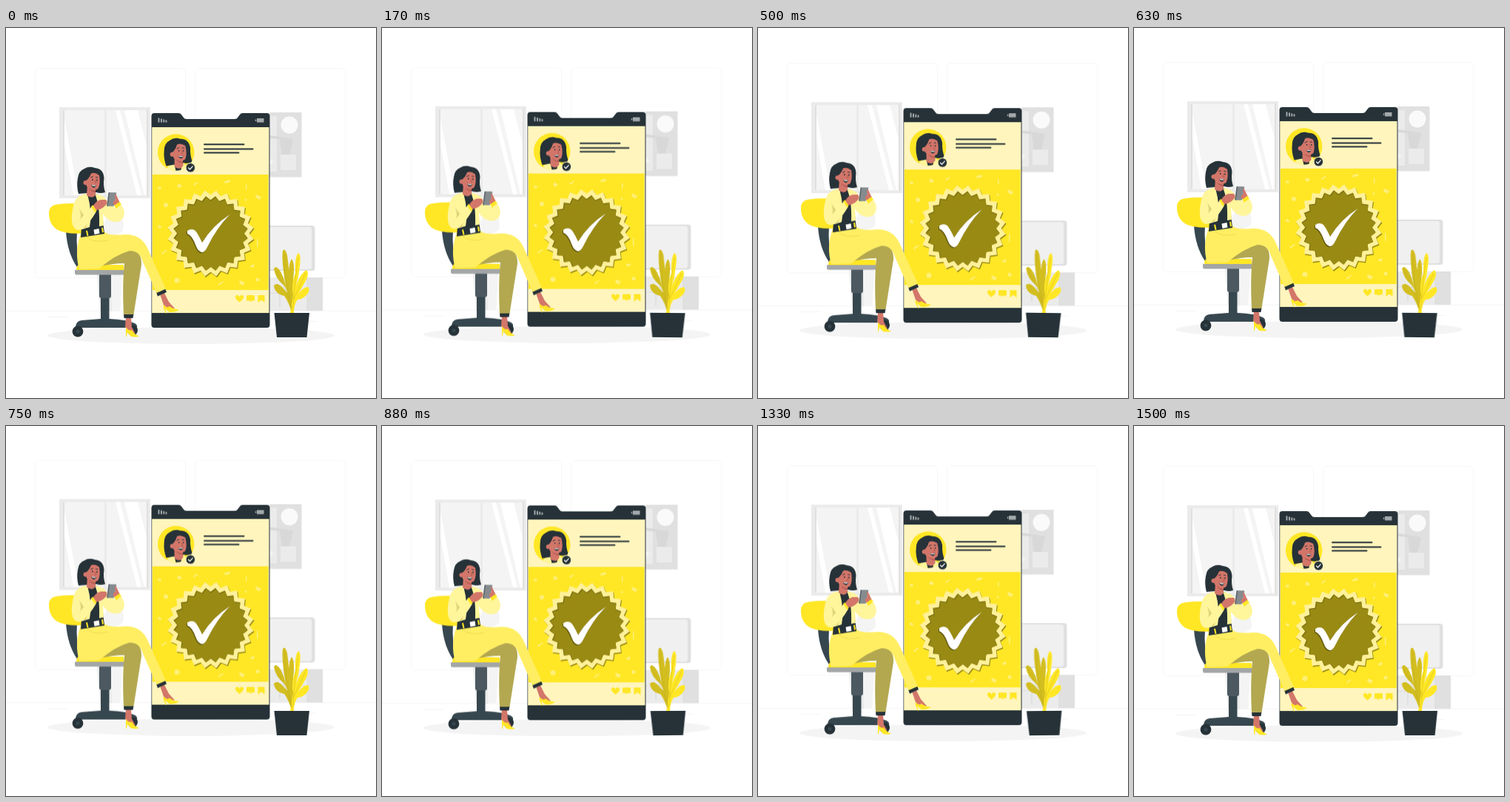
Write an HTML page without scripts that moves like this. It is 500 px wide and 500 px high and loops after 1540 ms.

```html
<!DOCTYPE html>
<html lang="en">
<head>
<meta charset="utf-8">
<title>Verified profile</title>
<style>
  html, body { margin: 0; width: 100%; height: 100%; overflow: hidden; background: #fff; }
  svg { display: block; width: 100%; height: 100%; }
  .float { animation: float 770ms cubic-bezier(.37, 0, .63, 1) -45ms infinite alternate; }
  .sway { transform-origin: 387px 345px; animation: sway 770ms cubic-bezier(.37, 0, .63, 1) -385ms infinite alternate; }
  @keyframes float { from { transform: translateY(.1px); } to { transform: translateY(-8.4px); } }
  @keyframes sway { from { transform: rotate(-.8deg); } to { transform: rotate(.8deg); } }
  .dark { fill: #263238; }
  .steel { fill: #37474f; }
  .sun { fill: #ffe725; }
  .cream { fill: #fff5bd; }
  .jacket { fill: #fff59b; }
  .trouser { fill: #ffee62; }
  .olive { fill: #998a14; }
  .shade { fill: #b3a850; }
  .mustard { fill: #d3be20; }
  .skin { fill: #d3766a; }
  .white { fill: #fff; }
  .g1 { fill: #f4f4f4; }
  .g2 { fill: #ebebeb; }
  .g3 { fill: #e0e0e0; }
  .line { fill: none; stroke-linecap: round; stroke-linejoin: round; }
</style>
</head>
<body>
<svg viewBox="0 0 500 500">
  <defs>
    <!-- six turned squares form a seal with 24 points -->
    <rect id="sq" x="-41.4" y="-41.4" width="82.8" height="82.8"/>
    <g id="seal" transform="rotate(7.5)">
      <use href="#sq"/>
      <use href="#sq" transform="rotate(15)"/>
      <use href="#sq" transform="rotate(30)"/>
      <use href="#sq" transform="rotate(45)"/>
      <use href="#sq" transform="rotate(60)"/>
      <use href="#sq" transform="rotate(75)"/>
    </g>
    <path id="tick" d="M245 274q6-4 11 0q4 5 9 16q14-23 37.500-38q-18 18-31 45q-3 6-7 6q-5-1-8-9q-5-14-11.500-16z"/>
    <clipPath id="portrait"><circle cx="229.700" cy="168" r="24.700"/></clipPath>

    <g id="head">
      <path class="dark" d="M97 203Q98 193 106 190Q112 186 120 189Q132 190 132.500 203Q131 213 134 222Q128 224 122 222L98 224Q95 213 97 203Z"/>
      <path class="skin" d="M110 212L121 217V225Q117 232 109 226Z"/>
      <path d="M111 215Q115 220 121 220V222Q114 221 111 215Z" fill="#b0584f"/>
      <path class="skin" d="M107 207Q112 204 115 196.500Q120 194 126 199Q128 210 124.500 217Q117 222 109 214Z"/>
      <circle class="skin" cx="107.500" cy="209" r="3"/>
      <path class="line" d="M114.500 202l3-1.300M121.500 201.500l2.500.5" stroke="#263238" stroke-width=".9"/>
      <circle class="dark" cx="116.800" cy="205" r=".9"/>
      <circle class="dark" cx="122.900" cy="205.500" r=".9"/>
      <path class="line" d="M120.500 205.500l1.600 3.600l-2 .2" stroke="#a94f47" stroke-width=".7"/>
      <path class="dark" d="M115 211.500q3.500 1.500 7 .5q-1 4-3.500 3.700q-2.500-.5-3.500-4.200z"/>
      <path class="white" d="M115.500 211.800q3 1.300 6 .5l-.5 1.200q-3 .5-5-.7z"/>
    </g>
  </defs>

  <g class="float">
    <g fill="none" stroke="#f7f7f7">
      <rect x="39.500" y="54.500" width="203" height="283" rx="5"/>
      <rect x="255.500" y="54.500" width="203" height="283" rx="5"/>
      <path d="M0 382.300H500M57 390.500H84M395 396.500H420" stroke="#f4f4f4"/>
    </g>

    <g id="window">
      <path class="g2" d="M72 107H195V230H72Z"/>
      <path class="g1" d="M79 111H190V226H79Z"/>
      <path class="white" d="M79 123L98 226H91L79 158ZM148 111H154L183 226H177ZM160 111H178L190 158V226H187Z"/>
      <path class="g2" d="M133 111H136V226H133Z"/>
      <path class="g3" d="M190 110H192V227H190ZM77 111H79V226H77Z"/>
    </g>

    <g id="furniture">
      <path class="g3" d="M356 114H399.500V201.500H356Z"/>
      <path class="g2" d="M356 119H366V194H356ZM371 171H392V192H371Z"/>
      <path d="M357 145L388 150L383 171H373L370 150L357 149Z" fill="#d8d8d8"/>
      <path class="g1" d="M356 176L362 181L356 185Z"/>
      <circle cx="383" cy="131" r="11.500" fill="#fafafa"/>
      <rect class="g3" x="350" y="267" width="67.500" height="61" rx="4"/>
      <rect x="350" y="269" width="63" height="57" rx="3" fill="#f0f0f0"/>
      <path class="g2" d="M356 337H406V382H356Z"/>
      <path class="g3" d="M406 337H428V382H406ZM356 358H404V359H356ZM369 359H371V377H369Z"/>
      <path class="g2" d="M123 333H157L154 383H127Z"/>
      <path class="g1" d="M142 333H157L154 383H143ZM130 278Q132 254 147 246Q162 258 158 274Q148 282 140 279Z"/>
    </g>
    <ellipse cx="250" cy="415.500" rx="194" ry="11.500" fill="#f4f4f4"/>
  </g>

  <g class="sway">
    <path class="mustard" d="M386 385Q383 372 376 362Q363 359 362 348Q366 343 373 350L380 358Q379 351 375 347Q364 339 362 325Q365 320 371 329Q376 338 378 348Q372 315 374 301Q377 296 380 307Q383 330 384 344Q380 322 386 312Q391 318 388 340L389 385Z"/>
    <path class="sun" d="M384 385Q386 374 388 361Q385 346 391 331Q390 309 395 304Q399 306 397 322Q396 335 392 348Q399 330 406 327Q410 331 406 340Q400 351 395 359Q402 350 408 350Q412 354 406 361Q400 367 394 367Q389 374 389 385Z"/>
    <path d="M376 305Q377 345 387 382M365 328Q379 352 386 380M395 310Q390 340 388 378M405 331L389 366" class="line" stroke="#b9a61a" stroke-width=".4"/>
    <path class="dark" d="M362.500 385H410L406.500 418H366Z"/>
  </g>

  <g class="float">
    <g id="phone">
      <path class="dark" d="M196.500 119Q196.500 115 200.500 115H233Q236 115 237 117L240 121Q241 123 244 123H309Q312 123 313 121L316 117Q317 115 320 115H352.500Q356.500 115 356.500 119V401Q356.500 405 352.500 405H200.500Q196.500 405 196.500 401Z"/>
      <path class="cream" d="M197.200 134H355.500V385H197.200Z"/>
      <path class="sun" d="M198 198H354.500V354H198Z"/>
      <path d="M205.500 121.500h2v6h-2zM209 122.500h2v5h-2zM212.300 123.500h2v4h-2zM215.500 124.500h2v3h-2zM339 122h9.500v5.500h-9.500zM336.800 123.500h1.500v2.500h-1.500z" fill="#a3a9ac"/>
      <g class="line" stroke="#263238" stroke-width="1.900">
        <path d="M268 157.300H321.500M268 163.500H333.500M268 168.500H314.500"/>
      </g>

      <circle class="sun" cx="229.700" cy="168" r="24.700"/>
      <g clip-path="url(#portrait)">
        <path class="jacket" d="M216 193Q219 185 226 183L240 183Q245 186 246 196H218Z"/>
        <path class="dark" d="M227 182H238L236 195H230Z"/>
        <use href="#head" transform="translate(117 -39) rotate(-5 115 207)"/>
      </g>
      <circle class="dark" cx="249.300" cy="188.800" r="6.300" stroke="#fff5bd"/>
      <path class="line" d="M246.500 189l2 2l3.700-4.200" stroke="#fff" stroke-width="1.200"/>

      <g fill="#fff078">
        <path d="M233 210l5 3l-3 3l-4-2zM206 214l4 1l-1 3l-4-1zM253 211l6-3l1 1l-6 4zM295 207l8-2v3l-7 2zM324 211h1.500v7h-1.500zM338 225l7 3l-2 4l-6-3zM206 266l4 2l-1 3l-4-2zM210 304l7-4l1 1l-7 5zM316 341l7 3l-3 4l-5-3zM339 285h1.500v11h-1.500zM287 346l6-4l1 1l-6 5zM330 321l5-2l1 3l-5 2z"/>
        <circle cx="216" cy="239" r="3"/><circle cx="231" cy="341" r="3.500"/>
        <circle cx="340" cy="340" r="2.500"/><circle cx="324" cy="232" r="1.500"/>
      </g>

      <use href="#seal" class="olive" transform="translate(277.500 279)"/>
      <use href="#seal" fill="#fff19a" transform="translate(276.500 277.500)"/>
      <use href="#seal" fill="#7d710f" transform="translate(276.500 277.500) scale(.865)"/>
      <use href="#seal" class="olive" transform="translate(277.100 278.300) scale(.85)"/>
      <use href="#tick" fill="#62580b" x="-1" y="1.200"/>
      <use href="#tick" class="white"/>

      <g class="sun">
        <path d="M315.500 370.500Q309 365.500 310 362.500Q312.500 359 315.500 363Q318.500 359 321 362.500Q322 365.500 315.500 370.500Z"/>
        <path d="M326.500 361H334.500Q336 361 336 362.500V367Q336 368.500 334.500 368.500H332L330 370.500V368.500H326.500Q325 368.500 325 367V362.500Q325 361 326.500 361Z"/>
        <path d="M340.500 361H349.500V371L345 367.500L340.500 371Z"/>
      </g>
    </g>

    <g id="chair">
      <path class="steel" d="M81 275H96Q94 300 101 323H96Q83 304 81 275Z"/>
      <path class="sun" d="M68 238.500Q86 236 105 238V277.500Q82 279 70 273Q58 266 58 250Q58 240 68 238.500Z"/>
      <path class="sun" d="M98 320H159V328H95Q95 321 98 320Z"/>
      <path class="steel" d="M128 360H139.500V393Q163 394 174 399Q178 401 177 405H94Q94 396 102 395L128 393Z"/>
      <path d="M126 333H142V362Q142 365 139 365H129Q126 365 126 362Z" fill="#4c5960"/>
      <path d="M93 327H159.500V333.500H95Q93 333.500 93 331Z" fill="#a3a6a7"/>
      <circle class="dark" cx="97" cy="410" r="7.400"/>
      <circle class="dark" cx="171" cy="408.500" r="7"/>
      <circle class="steel" cx="97" cy="410" r="2.500"/>
    </g>

    <g id="legs">
      <path class="skin" d="M162 391H169L170 404L175 413L167 411L161 404Z"/>
      <path class="sun" d="M162 404Q166 410 170 408Q173 414 180 416.500Q176 418 169 417L164 411L163 417H162Z"/>
      <path class="dark" d="M159 386H172.500L171.500 392H159.500Z"/>
      <path class="shade" d="M124 323Q145 299 170 299Q184 303 183 320L172.500 387H159Q157 345 160 318Q143 318 124 323Z"/>
      <path class="skin" d="M208.500 361L214 358L220 370L228 379L219 380L213 374Z"/>
      <path class="sun" d="M213 374Q217 379 221 376Q226 380 234 380.500Q230 384 221 384L215 379L217 385.500H216L212.500 377Z"/>
      <path class="dark" d="M203 357L215 352L217 357L205 362.500Z"/>
      <path class="trouser" d="M101 278L133 275Q137 281 160 279Q182 278 191 297L216 352.500L203.500 358L185 316Q181 301 167 301Q148 306 126 325L99 326Q92 302 101 278Z"/>
      <path class="line" d="M109 283Q119 291 137 287" stroke="#e0d04c" stroke-width=".6"/>
    </g>

    <g id="body">
      <path class="dark" d="M109 225L122 224L128 234L133 278L101 283L102 270Q112 255 109 225Z"/>
      <path class="white" d="M118.500 272.500L125.500 271L126.500 277.500L119.500 279Z"/>
      <path class="sun" d="M108 274l2-.5l1.500 7l-2 .5zM129 270l2-.4l1 6.500l-2 .5z"/>
      <path class="jacket" d="M120 224Q133 226 136 233L147 243L152 236Q160 241 160 251Q158 263 147 262Q137 261 131 251L132 267L126 268Q127 239 120 224Z"/>
      <path class="jacket" d="M110 224Q94 225 91 240Q87 257 90 266Q93 275 103 272L113 269Q117 250 110 224Z"/>
      <path class="shade" d="M99 244Q103 254 99 262L113 248Q113 259 108 270L101 271L110 260Z" opacity=".45"/>
      <path class="jacket" d="M90 262Q91 277 104 271Q114 262 122 248L116 241Q107 250 100 259Z"/>
      <path class="sun" d="M115 241L118 239L123 246L120 249Z"/>
      <path class="skin" d="M118 240Q122 233 128 232L135 232Q138 235 135 239Q130 245 122 246Z"/>
      <g transform="translate(-.8 -.3)">
        <path d="M139.500 222.500H149Q150.500 222.500 150 224L147 240Q147 241 145.500 241H138Q137 241 137.200 239.500Z" fill="#858b8f"/>
        <path d="M139.500 222.500H141L138.500 241H138Q137 241 137.200 239.500Z" fill="#5d666b"/>
      </g>
      <path class="skin" d="M147 226Q149 224 150 228L154 236L151 242L145 238Q144 234 148 232Z"/>
      <path class="sun" d="M146 240L153 235L156 238L149 244Z"/>
      <use href="#head"/>
    </g>
  </g>
</svg>
</body>
</html>
```
